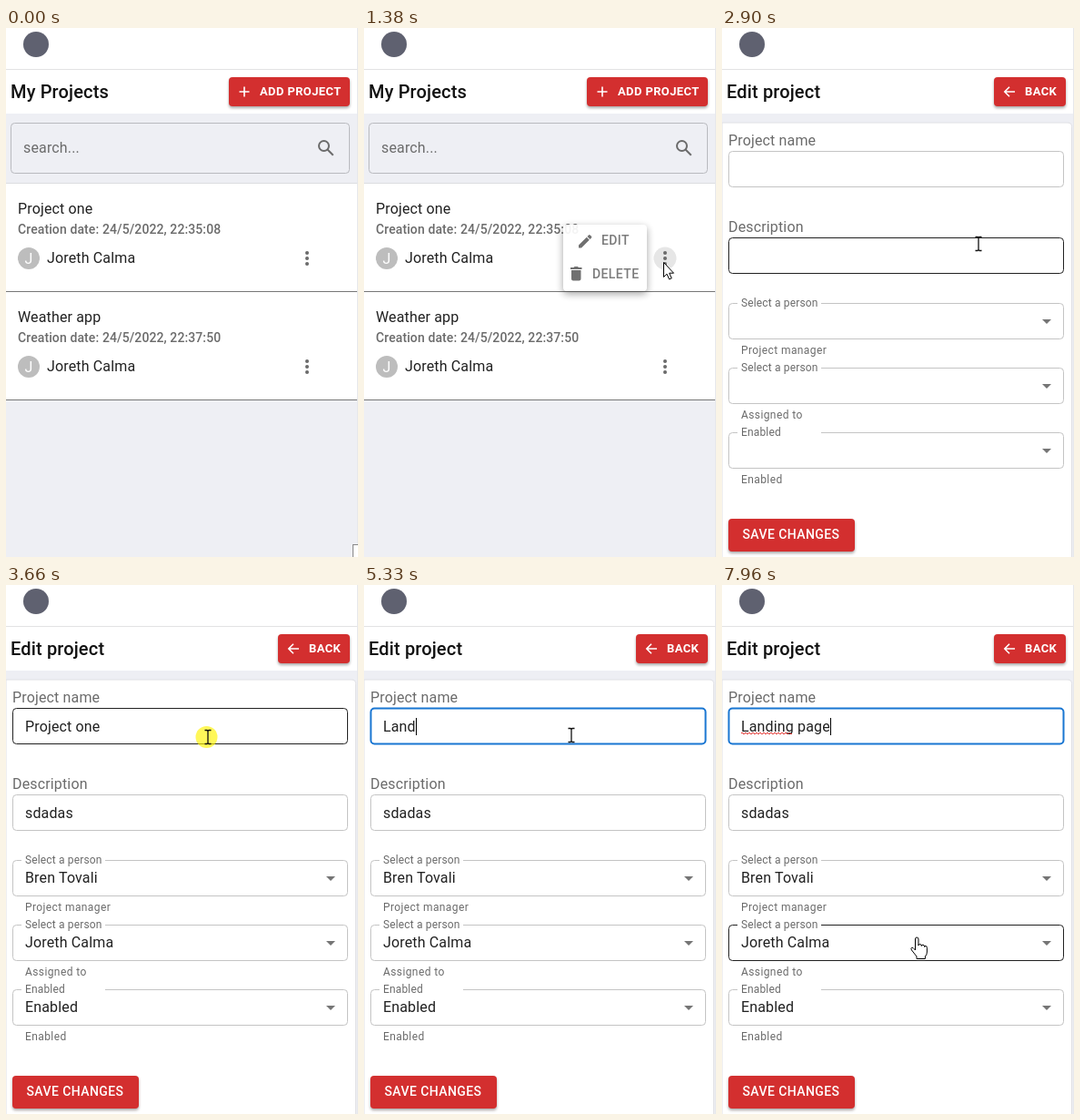
An HTML page for the animation above (8000 ms loop, 387 by 581 pixels).

```html
<!DOCTYPE html>
<html lang="en">
<head>
<meta charset="utf-8">
<title>Project editor</title>
<style>
  html, body { margin: 0; width: 100%; height: 100%; overflow: hidden; background: #fff; }
  svg { display: block; width: 387px; height: 581px; }
  text { font: 400 16px Roboto, sans-serif; letter-spacing: .15px; fill: #212121; white-space: pre; }
  .title { font-size: 20px; font-weight: 500; fill: #111; }
  .date { font-size: 14px; font-weight: 500; letter-spacing: .1px; fill: #6b6b6b; }
  .label { fill: #6b6b6b; }
  .small { font-size: 12px; fill: #6b6b6b; }
  .help { font-size: 12px; letter-spacing: .4px; fill: #6b6b6b; }
  .button { font-size: 14px; font-weight: 500; letter-spacing: .4px; fill: #fff; }
  .compact { font-size: 13px; letter-spacing: .37px; font-weight: 700; }
  .menu { fill: #707070; }
  .red { fill: #d32f2f; filter: drop-shadow(0 2px 1.5px #0005); }
  .box { fill: none; stroke: #c4c4c4; }
  .line { fill: none; stroke: #fff; stroke-width: 1.6; }
  .pointer { fill: #fff; stroke: #000; stroke-linejoin: round; }
  #menu { transform-origin: 311px 253px; }
  #paper { fill: #fff; filter: drop-shadow(0 3px 4px #0006); }
</style>
</head>
<body>
<svg viewBox="0 0 387 581">
  <defs><clipPath id="editClip"><path d="M219 253V220q0-4 4-4h84q4 0 4 4v33z"/></clipPath></defs>
  <rect width="387" height="581" fill="#eeeff4"/>
  <rect width="386" height="94" fill="#fff"/>
  <path d="M0 45.5H386" stroke="#e2e2e4"/>
  <path d="M386.5 0V581" stroke="#e6e7ea"/>
  <circle cx="33" cy="18" r="14" fill="#5f6170"/>
  <g id="list"></g>
  <g id="form"></g>
  <g id="menu">
    <rect id="paper" x="219" y="216" width="92" height="73" rx="4"/>
    <g clip-path="url(#editClip)">
      <rect id="editHover" x="219" y="216" width="92" height="37" fill="#e0e3e4"/>
      <circle id="ripple" cx="282" cy="238" fill="#d0d4d6"/>
    </g>
    <g fill="#646464">
      <path d="M236 238.500V241.500h3l8.800-8.800-3-3zM250 230.400q.8-.8 0-1.600l-1.400-1.400q-.8-.8-1.600 0l-1.500 1.500 3 3z"/>
      <path d="M228 266h10.500v9.500q0 2-2 2h-6.500q-2 0-2-2zM227 263h3.500l1-1h3.500l1 1h3.500v2H227z"/>
    </g>
    <text class="button menu" x="261" y="238">EDIT</text>
    <text class="button menu" x="251" y="275">DELETE</text>
  </g>
  <circle id="click" cx="220.500" cy="167" r="12" fill="#fff200" opacity=".65"/>
  <rect id="corner" x="381.500" y="567.500" width="9" height="18" fill="#fff" stroke="#888"/>
  <g id="cursor">
    <path id="arrow" class="pointer" d="M.5.5V16.500L4 13.200 6.600 19 9.200 17.900 6.700 12.200H11.500Z"/>
    <path id="beam" d="M-3.500-7.500H-1L0-6.500 1-7.500H3.500M0-6.500V6.500M-3.500 7.500H-1L0 6.500 1 7.500H3.500" fill="none" stroke="#111" stroke-width="1.300"/>
    <path id="hand" class="pointer" d="M-1.500 13V1q0-2 1.700-2T2 1V8q0-1.500 1.700-1.500T5.300 8.500q0-1.500 1.700-1.300T8.600 9.500q0-1.200 1.400-1T11.400 10.500V15q0 3-2 5v2.500H0V20L-5.500 13q-1.300-2 .2-2.700 1.300-.4 2.300 1.200z"/>
  </g>
</svg>
<script>
const $ = id => document.getElementById(id);
const text = (x, y, label, type = '', id = '') => `<text x="${x}" y="${y}" class="${type}" id="${id}">${label}</text>`;
const button = (x, y, w, h) => `<rect class="red" x="${x}" y="${y}" width="${w}" height="${h}" rx="4"/>`;
const person = 'Joreth Calma';

const item = (y, name, time) => `<g transform="translate(0 ${y})">
  ${text(13, 34, name)}${text(13, 56, 'Creation date: 24/5/2022, ' + time, 'date')}
  <circle cx="25" cy="83" r="12" fill="#bdbdbd"/>
  <text x="25" y="88.500" text-anchor="middle" style="fill:#fff">J</text>
  ${text(45, 88, person)}
  <g fill="#6b6b6b"><circle cx="331" cy="77" r="2"/><circle cx="331" cy="83" r="2"/><circle cx="331" cy="89" r="2"/></g>
  <path d="M0 119.500H386" stroke="#777"/></g>`;

const field = (y, id) => `<rect class="box" id="${id}" x="7.500" y="${y + .5}" width="368" height="39" rx="4"/>`;
const select = (y, id, label, value, help) => field(y, id) +
  `<path d="M17 ${y + .5}H109" stroke="#fff" stroke-width="3"/><path d="M352 ${y + 18}h10l-5 5z" fill="#757575"/>` +
  text(21, y + 4, label, 'small') + text(21, y + 25, value, 'value') + text(21, y + 56, help, 'help');

$('list').innerHTML = text(5, 77, 'My Projects', 'title') + button(245, 54, 133, 32) +
  '<path class="line" d="M256.500 70h11M262 64.500v11"/>' + text(279, 74, 'ADD PROJECT', 'button compact') +
  `<rect class="box" x="5.500" y="104.500" width="372" height="55" rx="4" style="stroke:#b9babf"/>` +
  text(19, 137, 'search...', 'label') +
  `<g fill="none" stroke="#6b6b6b" stroke-width="2"><circle cx="349.500" cy="129.500" r="5.500"/><path d="M353.500 133.500L359.700 139.700"/></g>
  <rect y="170" width="386" height="239" fill="#fff"/><path d="M0 170.500H386" stroke="#dcdde0"/>
  <circle id="hover" cx="331" cy="253" r="12.500" fill="#e6e6e6"/>` +
  item(170, 'Project one', '22:35:08') + item(289, 'Weather app', '22:37:50');

$('form').innerHTML = text(5, 77, 'Edit project', 'title') + button(299, 54, 79, 32) +
  '<path class="line" d="M322 70H311M316 64.800L310.800 70 316 75.200"/>' + text(333, 74, 'BACK', 'button compact') +
  '<path d="M0 581V104H380q4.500 0 4.500 4.500V581" fill="#fff" stroke="#dfe0e4"/>' +
  text(7, 129, 'Project name', 'label') + field(135, 'nameBox') +
  '<rect id="selection" x="21" y="146" height="19" fill="#3390ff"/>' + text(21, 161, '', 'value', 'name') +
  `<path id="spelling" d="M21 163${'q1-2 2 0t2 0'.repeat(14)}" fill="none" stroke="#e53935"/>
  <rect id="caret" y="146" width="1" height="19"/>` +
  text(7, 224, 'Description', 'label') + field(230, 'descBox') + text(21, 256, 'sdadas', 'value') +
  select(302, 'managerBox', 'Select a person', 'Bren Tovali', 'Project manager') +
  select(373, 'assignBox', 'Select a person', person, 'Assigned to') +
  select(444, 'enabledBox', 'Enabled', 'Enabled', 'Enabled') +
  button(7, 539, 139, 36) + text(22.5, 561, 'SAVE CHANGES', 'button');

const path = [[70, 381, 568], [830, 313, 267], [900, 313, 267], [1040, 329, 257], [1660, 329, 257], [2000, 303, 258],
  [2200, 303, 258], [2550, 282, 237], [3040, 282, 237], [3390, 222, 167], [3660, 222, 167], [4130, 228, 165],
  [7269, 228, 165], [7270, 227, 220], [7960, 214, 388]];
const typed = 'Landing page';
const keys = [4730, 5000, 5130, 5330, 5470, 5530, 5600, 5740, 6270, 6530, 6730, 6800];
const boxes = { nameBox: 135, descBox: 230, managerBox: 302, assignBox: 373, enabledBox: 444 };
const pageSwitch = 2860, loaded = 3040, focused = 3740, selected = 3870;

const clamp = v => Math.max(0, Math.min(1, v));
const ease = v => v * v * (3 - 2 * v);
const show = (id, on) => $(id).style.display = on ? '' : 'none';

function pointerAt(t) {
  const i = path.findIndex(p => p[0] > t);
  if (i < 0) return path.at(-1).slice(1);
  if (!i) return path[0].slice(1);
  const [a, b] = [path[i - 1], path[i]];
  const k = ease((t - a[0]) / (b[0] - a[0]));
  return [a[1] + (b[1] - a[1]) * k, a[2] + (b[2] - a[2]) * k];
}

function draw(t) {
  const [x, y] = pointerAt(t);
  const editing = t >= pageSwitch;
  show('list', !editing);
  show('form', editing);
  show('corner', t < 70);
  show('cursor', t >= 70);
  $('cursor').setAttribute('transform', `translate(${Math.round(x)} ${Math.round(y)})`);

  show('hover', t >= 1180 && t < 1800);
  const open = 1 - (1 - clamp((t - 1180) / 280)) ** 2;
  show('menu', t >= 1180 && !editing);
  $('menu').style.opacity = open;
  const grow = clamp(open * 1.1);
  $('menu').style.transform = `scale(${.75 + .25 * grow}, ${.56 + .44 * grow})`;
  const onEdit = !editing && t > 2200 && y < 253;
  show('editHover', onEdit);
  $('ripple').setAttribute('r', 62 * ease(clamp((t - 2500) / 300)));

  let shape = onEdit ? 'beam' : 'arrow';
  for (const [id, top] of Object.entries(boxes)) {
    const over = editing && y >= top && y <= top + 40;
    if (over) shape = top < 300 ? 'beam' : 'hand';
    const focus = id === 'nameBox' && t >= focused;
    $(id).style.stroke = focus ? '#1976d2' : over ? '#212121' : '';
    $(id).style.strokeWidth = focus ? 2 : 1;
  }
  for (const id of ['arrow', 'beam', 'hand']) show(id, id === shape);
  show('click', t >= 3660 && t < 3870);

  for (const value of document.querySelectorAll('.value')) value.style.visibility = t < loaded ? 'hidden' : '';
  const count = keys.filter(k => k <= t).length;
  const name = $('name');
  name.textContent = count ? typed.slice(0, count) : 'Project one';
  const marked = t >= selected && !count;
  name.style.fill = marked ? '#fff' : '';
  const width = editing ? name.getComputedTextLength() : 0;
  $('selection').setAttribute('width', width);
  $('caret').setAttribute('x', Math.round(21 + width));
  show('selection', marked);
  show('caret', t >= focused && !marked);
  show('spelling', t >= 5740);
}

function tick() {
  draw(performance.now() % 8000);
  requestAnimationFrame(tick);
}
tick();
</script>
</body>
</html>
```
